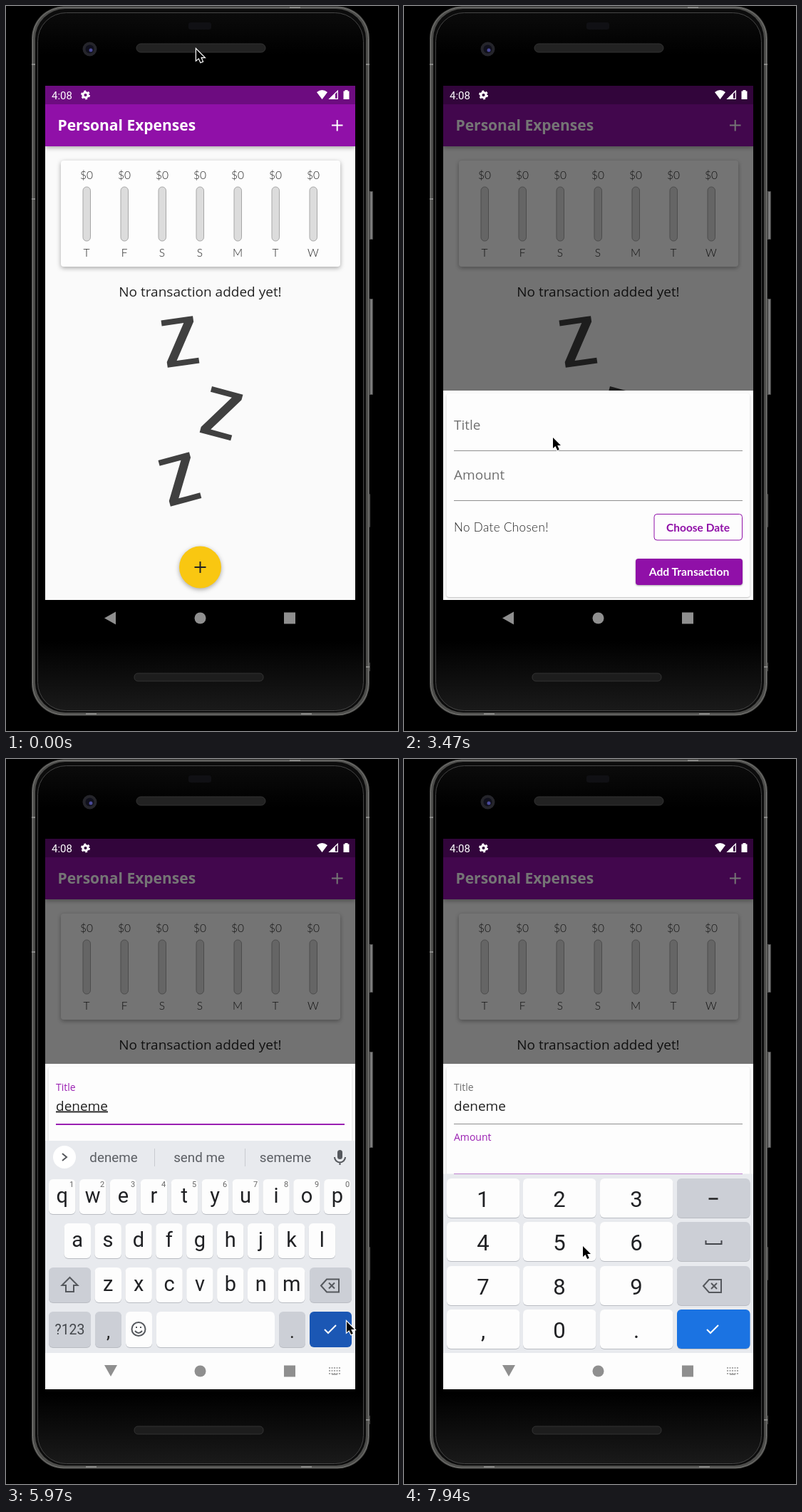
Recreate the animation shown at these times as an HTML page. Size 550 by 1018 pixels, loop 8 s.

```html
<!DOCTYPE html>
<html lang="en">
<head>
<meta charset="utf-8">
<title>Personal Expenses</title>
<style>
  html, body { margin: 0; width: 100%; height: 100%; overflow: hidden; background: #000; }
  svg { display: block; }
  text { font-family: "Open Sans", sans-serif; }
  .lato { font-family: Lato, sans-serif; }
  .light { font-weight: 300; }
  .robo { font-family: Roboto, sans-serif; }
  .mid { text-anchor: middle; }
  .ico { fill: none; stroke: #55585d; stroke-width: 2; }
  .soft { filter: drop-shadow(0 2px 3px #0005); }
</style>
</head>
<body>
<svg id="stage" width="550" height="1018" viewBox="0 0 550 1018"></svg>
<script>
const PURPLE = '#9010a8', GREY = '#cccfd6';
const rect = (x, y, w, h, fill, r = 0, more = '') =>
  `<rect x="${x}" y="${y}" width="${w}" height="${h}" rx="${r}" fill="${fill}" ${more}/>`;
const circle = (x, y, r, fill, more = '') => `<circle cx="${x}" cy="${y}" r="${r}" fill="${fill}" ${more}/>`;
const text = (x, y, size, fill, str, cls = '', more = '') =>
  `<text x="${x}" y="${y}" font-size="${size}" fill="${fill}" class="${cls}" ${more}>${str}</text>`;
const path = (d, more = '') => `<path d="${d}" ${more}/>`;
const line = (d, color, width) => path(d, `fill="none" stroke="${color}" stroke-width="${width}"`);
const group = (id, body, more = '') => `<g id="${id}" ${more}>${body}</g>`;

function phone() {
  const button = (y, h) => rect(508, y, 7, h, '#4a4a4a', 1) + rect(511.5, y + 1, 2, h - 2, '#8c8c8c');
  return `<linearGradient id="body" x2="0" y2="1">
      <stop stop-color="#0b0b0b"/><stop offset=".06" stop-color="#000"/>
      <stop offset=".9" stop-color="#000"/><stop offset="1" stop-color="#1a1a1a"/>
    </linearGradient>` +
    button(260, 68) + button(411, 135) +
    rect(508, 685, 3, 47, '#555', 1) + rect(508, 922, 3, 12, '#444') +
    rect(36, 0.5, 474, 996, '#4c4c4a', 45) +
    rect(37.5, 2, 471, 993, 'none', 43.5, 'stroke="#777774"') +
    rect(41, 4, 464, 988, '#0c0c0c', 42) +
    rect(44.5, 9.5, 457, 980, 'url(#body)', 40, 'stroke="#454545"') +
    line('M36 82h5M36 271h5M505 82h5M505 928h5M398 2h15M112 994h15M414 994h15', '#8a8a88', 2) +
    rect(256, 23, 32, 10, '#101014', 3) +
    circle(117.5, 60.5, 10, '#25252b') + circle(117.5, 60.5, 6, '#10101c') + circle(119, 62, 2.5, '#4a4a99') +
    rect(183, 53, 181, 12, '#222', 6, 'stroke="#333"') +
    rect(180, 937, 181, 11, '#1d1d1d', 5, 'stroke="#333"');
}

function home() {
  const days = [...'TFSSMTW'].map((day, i) => {
    const x = 113 + 53 * i;
    return text(x, 243, 15.5, '#222', '$0', 'lato light mid') +
      rect(x - 5, 254, 10.5, 76, '#dcdcdc', 5.2, 'stroke="#a6a6a6"') +
      text(x, 352, 15.5, '#222', day, 'lato light mid');
  }).join('');
  const zed = (x, y, turn) => path('M0 0H45V8L14 59H45V67H0V59L31 8H0Z',
    `fill="#404040" transform="translate(${x} ${y}) rotate(${turn})"`);
  return rect(55, 112, 435, 722, '#fafafa') +
    rect(55, 112, 435, 85, PURPLE, 0, 'class="soft"') + rect(55, 112, 435, 26, '#6d0c80') +
    text(72.5, 174.5, 21, '#fff', 'Personal Expenses', '', 'font-weight="700"') +
    line('M457 167.5h15.5M464.7 160v15.5', '#fff', 2) +
    rect(77, 217, 392, 149, '#fdfdfd', 4, 'class="soft"') + days +
    text(272.5, 408, 19, '#222', 'No transaction added yet!', 'mid') +
    zed(217.5, 441.5, -8) + zed(289, 534, 15) + zed(213.5, 638, -15) +
    circle(272.5, 788, 29.5, '#f9c711', 'class="soft"') +
    line('M264.5 788h16M272.5 780v16', '#222', 2);
}

function sheet() {
  return rect(55, 540, 435, 406, '#fdfdfd') +
    rect(59.5, 544, 426, 286, '#fdfdfd', 4, 'style="filter:drop-shadow(0 1px 1px #0004)"') +
    text(70, 0, 19, '', 'Title', '', 'id="titleLabel"') + text(70, 605.5, 19, '#222', '', '', 'id="title"') +
    rect(70, 624, 405, 1, '', 0, 'id="titleLine"') +
    text(70, 0, 19, '', 'Amount', '', 'id="amountLabel"') +
    rect(70, 694, 405, 1, '', 0, 'id="amountLine"') +
    text(70, 738, 17, '#222', 'No Date Chosen!', 'lato light', 'letter-spacing=".4"') +
    rect(351, 713.5, 123.5, 36.5, '#fdfdfd', 4, `stroke="${PURPLE}"`) +
    text(412.5, 737.5, 15.5, PURPLE, 'Choose Date', 'lato mid', 'font-weight="700"') +
    rect(325, 776, 150, 37, PURPLE, 4, 'style="filter:drop-shadow(0 1px 1px #0005)"') +
    text(400, 800, 15.7, '#fff', 'Add Transaction', 'lato mid', 'font-weight="700"');
}

const key = (x, y, w, h, fill = '#fdfdfd') =>
  rect(x, y + 1, w, h, '#b9bcc2', 6) + rect(x, y, w, h, fill, 6);
const check = (x, y) => line(`M${x - 8} ${y}l5 5 11-11`, '#fff', 2);
const erase = (x, y) => path(`M${x - 13} ${y}l8-9h17v18h-17zM${x - 2} ${y - 4}l8 8m0-8l-8 8`, 'class="ico"');
const mic = rect(465, 549, 7, 13, '#55585d', 3.5) + path('M461 559a7.5 7.5 0 0 0 15 0M468.5 566v4', 'class="ico"');
const chevron = dir => circle(82, 559, 16, '#fff') + path(`M${82 - 3 * dir} 554l${6 * dir} 5 ${-6 * dir} 5`, 'class="ico"');

function letters() {
  const row = (chars, x0, y) => [...chars].map((c, i) => {
    const x = x0 + i * 42.9;
    return key(x, y, 37.5, 49) + text(x + 18.7, y + 33, 29, '#202124', c, 'robo mid');
  }).join('');
  const hints = [...'1234567890'].map((c, i) =>
    text(92 + i * 43, 601, 11, '#666', c, 'robo mid')).join('');
  const tools = chevron(-1) +
    path('M149 568l-7-7M143.5 557a5.5 5.5 0 1 1-11 0 5.5 5.5 0 0 1 11 0', 'class="ico"') +
    path('M194 551h16v10l-6 6h-10zM210 561h-6v6M198 560q4 4 7 0M198 555h1M205 555h1', 'class="ico"') +
    text(264, 564, 14, '#55585d', 'GIF', 'robo mid', 'font-weight="900"') +
    path('M320.5 552h15v16h-15zM325 550.5h6M324 557h8M324 561h8M324 565h5', 'class="ico"') +
    line('M366.5 547v25', '#cfd1d6', 1) +
    [398, 405, 412].map(x => circle(x, 559.5, 2, '#55585d')).join('');
  const words = chevron(1) + line('M208.5 547v25M335.5 547v25', '#c9cbd0', 1) +
    [151, 271, 392].map((x, i) => text(x, 566, 18.8, '#5b5e63', '', 'robo mid', `id="word${i}"`)).join('');
  return rect(55, 536, 435, 300, '#e8eaee') + group('tools', tools) + group('words', words) + mic +
    row('qwertyuiop', 60, 590) + hints + row('asdfghjkl', 81.5, 652) +
    key(60, 714, 59, 49, GREY) + path('M89.5 728l11 11h-5.5v9h-11v-9h-5.5z', 'class="ico"') +
    row('zxcvbnm', 124.5, 714) + key(426, 714, 59, 49, GREY) + erase(455, 739.5) +
    key(60, 776, 59, 50, GREY) + text(89.5, 808, 19.5, '#44474c', '?123', 'robo mid') +
    key(125, 776, 37, 50, GREY) + text(143.5, 813, 26, '#222', ',', 'robo mid') +
    key(168, 776, 37, 50) + circle(186, 800.5, 9.5, 'none', 'class="ico"') +
    path('M181 803q5 6 10 0M182 798h2M188 798h2', 'class="ico"') +
    key(211, 776, 166, 50) +
    key(383, 776, 37, 50, GREY) + text(401.5, 813, 26, '#222', '.', 'robo mid') +
    rect(426, 776, 59, 50, '', 6, 'id="enter"') + check(455, 801);
}

function numbers() {
  const xs = [60, 167, 275, 383], ys = [589, 650, 712, 773];
  const pad = ys.map((y, r) => xs.map((x, c) => {
    const fill = c < 3 ? '#fdfdfd' : r < 3 ? GREY : '#1b73e2';
    const label = c < 3 ? ['123', '456', '789', ',0.'][r][c] : '';
    return key(x, y, 102.5, 55, fill) + text(x + 51, y + 40, 31, '#202124', label, 'robo mid');
  }).join('')).join('');
  return rect(55, 582.5, 435, 260, '#e8eaee') + pad + line('M427.5 617.5h13', '#222', 2.5) +
    line('M423.5 676v5h22v-5', '#44474c', 2) + erase(433, 740) + check(433, 801);
}

function nav() {
  const dots = [0, 1, 2].map(r => [0, 1, 2, 3, 4].map(c =>
    rect(453 + c * 3.5, 854 + r * 4, 2, 2, '#aaa')).join('')).join('');
  return rect(55, 834, 435, 51, '#000', 0, 'id="navBack"') +
    path('', 'id="back" fill="#8f8f8f"') + circle(272.5, 859.5, 8, '#8f8f8f') +
    rect(390, 851.5, 16, 16, '#8f8f8f') + group('dots', dots + rect(457, 863, 8, 2, '#aaa'));
}

function status() {
  return text(64, 130.5, 15, '#fff', '4:08', 'robo') +
    circle(111.5, 125, 3.6, 'none', 'stroke="#fff" stroke-width="3"') +
    circle(111.5, 125, 5.5, 'none', 'stroke="#fff" stroke-width="2" stroke-dasharray="2.9 2.86"') +
    path('M436 121q7.5-6 15 0l-7.5 10zM473.5 119.5h2v-1.5h4v1.5h2v11.5h-8z', 'fill="#fff"') +
    path('M454 130.3h11.3v-11z', 'fill="none" stroke="#fff" stroke-width="1.3"') +
    path('M453 131h9v-9z', 'fill="#fff"');
}

document.getElementById('stage').innerHTML = phone() +
  `<svg x="55" y="112" width="435" height="722" viewBox="55 112 435 722">` +
  home() + rect(55, 112, 435, 722, '#000', 0, 'id="dim"') + status() +
  group('sheet', sheet()) + group('letters', letters()) + group('numbers', numbers()) + '</svg>' + nav() +
  path('M0 0V15L3.5 12 6.2 18 8.8 16.8 6.2 11H11Z',
    'id="mouse" fill="#000" stroke="#fff" stroke-width="2.4" paint-order="stroke"');

const el = id => document.getElementById(id);
const set = (id, attrs) => { for (const k in attrs) el(id).setAttribute(k, attrs[k]); };
const show = (id, on) => set(id, { visibility: on ? 'inherit' : 'hidden' });
const ramp = (t, start, span) => {
  const p = Math.min(1, Math.max(0, (t - start) / span));
  return p * p * (3 - 2 * p);
};
const within = (t, from, to) => t >= from && t < to;

// time, x, y of the mouse tip
const TRACK = [
  [0, 267, 61], [400, 267, 61], [1430, 337, 614], [1900, 275, 789], [2060, 275, 789],
  [2400, 213, 598], [2500, 210, 590], [2670, 210, 590], [3500, 209, 606], [4130, 209, 619],
  [5200, 209, 619], [5880, 478, 790], [6120, 478, 790], [6540, 254, 657], [6970, 252, 662],
  [7800, 251, 684], [8000, 251, 684]
];

function moveMouse(t) {
  const i = TRACK.findIndex(k => k[0] > t);
  const [t0, x0, y0] = TRACK[i - 1], [t1, x1, y1] = TRACK[i];
  const p = ramp(t, t0, t1 - t0);
  set('mouse', { transform: `translate(${x0 + (x1 - x0) * p} ${y0 + (y1 - y0) * p})` });
}

function field(id, base, float, focused) {
  set(id + 'Label', { y: base - 17 * float, 'font-size': 19 - 5 * float, fill: focused ? '#9a1fb2' : '#707070' });
  set(id + 'Line', { height: focused ? 2 : 1, fill: focused ? '#9a1fb2' : '#8f8f8f' });
}

function draw(t) {
  const open = ramp(t, 2310, 80);
  const lifted = within(t, 4190, 6180) || t >= 7500;
  const typed = 'deneme'.slice(0, Math.max(0, Math.floor((t - 4400) / 160)));
  const abc = ramp(t, 3880, 170) - ramp(t, 6170, 170);
  const num = ramp(t, 7220, 170);
  const white = within(t, 3880, 6250) || t >= 7220;
  const titleFocus = within(t, 3700, 6080);

  set('dim', { opacity: 0.54 * open });
  set('sheet', { transform: `translate(0 ${lifted ? -112 : 294 * (1 - open)})` });
  show('sheet', open > 0);
  field('title', 595, ramp(t, 3700, 160), titleFocus);
  field('amount', 665, ramp(t, 6800, 160), t >= 6800);
  el('title').textContent = typed;
  set('title', { 'text-decoration': titleFocus ? 'underline' : 'none' });

  show('letters', abc > 0);
  set('letters', { transform: `translate(0 ${300 * (1 - abc)})` });
  show('numbers', num > 0);
  set('numbers', { transform: `translate(0 ${252 * (1 - num)})` });
  show('tools', !typed && abc > 0);
  show('words', typed && abc > 0);
  const done = typed === 'deneme';
  [typed, done ? 'send me' : '', done ? 'sememe' : ''].forEach((w, i) => el('word' + i).textContent = w);
  set('enter', { fill: within(t, 5930, 6080) ? '#1b57b4' : '#1b73e2' });

  set('navBack', { fill: white ? '#fdfdfd' : '#000' });
  set('back', { d: white ? 'M138 851h18l-9 16z' : 'M138 859.5l16-9v18z' });
  show('dots', white);
  moveMouse(t);
}

function tick(now) {
  draw(now % 8000);
  requestAnimationFrame(tick);
}
draw(0);
requestAnimationFrame(tick);
</script>
</body>
</html>
```
